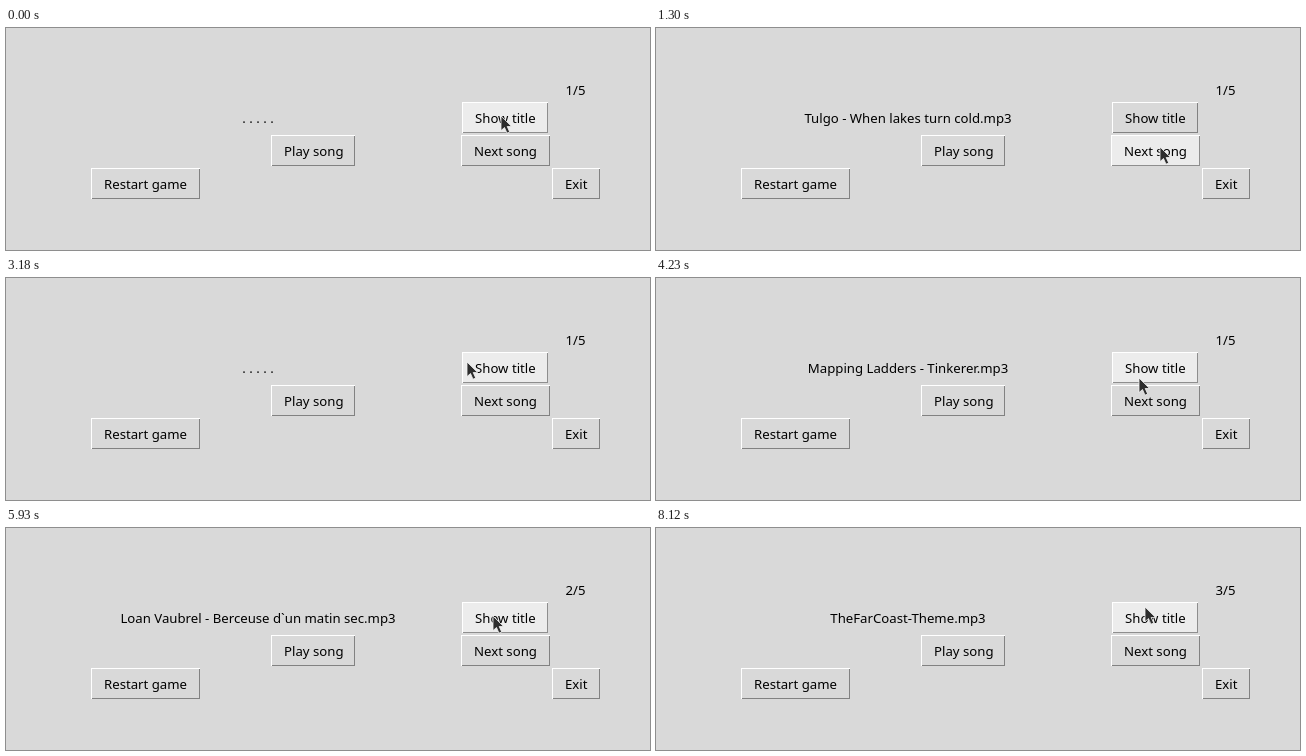
Recreate the animation shown at these times as an HTML page. Size 644 by 222 pixels, loop 8200 ms.

```html
<!DOCTYPE html>
<html lang="en">
<head>
<meta charset="utf-8">
<title>Song quiz</title>
<style>
  html, body { margin: 0; width: 100%; height: 100%; overflow: hidden; background: #d9d9d9; }
  svg { display: block; width: 644px; height: 222px; }
  text { font: 13.2px "Noto Sans", "Open Sans", sans-serif; fill: #000; white-space: pre; }
  .mid { text-anchor: middle; }
  .button { --face: #d9d9d9; --lit: #fff; --dark: #828282; }
  .button.hot { --face: #ececec; --dark: #8e8e8e; }
  .button rect { fill: var(--face); }
  .edge { fill: none; shape-rendering: crispEdges; }
  .near { stroke: var(--lit); }
  .far { stroke: var(--dark); }
  .down .near { stroke: var(--dark); }
  .down .far { stroke: var(--lit); }
  .down text { transform: translate(2px, 2px); }
</style>
</head>
<body>
<svg viewBox="0 0 644 222">
  <text id="count" class="mid" x="569.5" y="67"></text>
  <text id="title" class="mid" x="252" y="95"></text>
  <g id="buttons"></g>
  <path id="cursor" d="M0 0V14.6L3.5 11.5L6 17.2L8.7 16L6.2 10.5H10.6Z"
        fill="#2d2d2d" stroke="#f4f4f4" stroke-width=".8" stroke-linejoin="round"/>
</svg>
<script>
const LOOP = 8200, STEP = 80, HEIGHT = 31, ROW = 33, TOP = 74;
const $ = id => document.getElementById(id);

function makeButton(label, x, row, w) {
  const y = TOP + row * ROW;
  const el = document.createElementNS('http://www.w3.org/2000/svg', 'g');
  el.setAttribute('class', 'button');
  el.setAttribute('transform', `translate(${x} ${y})`);
  el.innerHTML = `<rect width="${w}" height="${HEIGHT}"/>
    <path class="edge far" d="M0 ${HEIGHT - 0.5}H${w}M${w - 0.5} 0V${HEIGHT}"/>
    <path class="edge near" d="M0 .5H${w}M.5 0V${HEIGHT}"/>
    <text x="13" y="21">${label}</text>`;
  $('buttons').append(el);
  const contains = (px, py) => px >= x && px < x + w && py >= y && py < y + HEIGHT;
  return { el, contains };
}

const show = makeButton('Show title', 456, 0, 86);
const play = makeButton('Play song', 265, 1, 84);
const next = makeButton('Next song', 455, 1, 89);
const restart = makeButton('Restart game', 85, 2, 109);
const exit = makeButton('Exit', 546, 2, 48);
const buttons = [show, play, next, restart, exit];

const songs = [
  'Tulgo - When lakes turn cold.mp3',
  'Mapping Ladders - Tinkerer.mp3',
  'Loan Vaubrel - Berceuse d`un matin sec.mp3',
  'TheFarCoast-Theme.mp3',
];

const START = { x: 495, y: 88 };
const glides = [], clicks = [];
const glide = (at, steps, x, y, sag = 0) => glides.push({ at, steps, x, y, sag });
const click = (button, from, to) => clicks.push({ button, from, to });

click(show, 330, 490);
glide(900, 6, 504, 119);
glide(1380, 5, 160, 146, 40);
click(restart, 1940, 2770);
glide(3020, 5, 482, 80);
click(show, 3580, 3740);
glide(4230, 3, 484, 108);
click(next, 4550, 5440);     // the pointer leaves while the button is still held
glide(5040, 4, 487, 88);
click(show, 5770, 5930);
glide(6340, 2, 494, 117);
click(next, 6670, 7400);
glide(7080, 5, 497, 78);
click(show, 7640, 7880);
glide(8120, 1, 489, 79);

const easeOut = p => 1 - (1 - p) ** 3;

function pointerAt(t) {
  let { x, y } = START;
  for (const g of glides) {
    if (t < g.at) break;
    const step = Math.floor((t - g.at) / STEP) + 1;
    const p = easeOut(Math.min(1, step / g.steps));
    x += (g.x - x) * p;
    y += (g.y - y) * p + g.sag * Math.sin(Math.PI * p);
  }
  return [Math.round(x), Math.round(y)];
}

// Replays every finished click up to time t
function gameAt(t) {
  let song = 0, count = 1, shown = false;
  for (const { button, to } of clicks) {
    if (t < to) break;
    shown = button === show;
    if (!shown) song++;
    if (button === next) count++;
    if (button === restart) count = 1;
  }
  return { title: shown ? songs[song] : '. . . . .', count: `${count}/5` };
}

function draw(t) {
  const [x, y] = pointerAt(t);
  const held = clicks.find(c => t >= c.from && t < c.to)?.button;
  for (const b of buttons) {
    b.el.classList.toggle('hot', held ? b === held : b.contains(x, y));
    b.el.classList.toggle('down', b === held);
  }
  const { title, count } = gameAt(t);
  $('title').textContent = title;
  $('count').textContent = count;
  $('cursor').setAttribute('transform', `translate(${x} ${y})`);
}

const begin = performance.now();
function tick() {
  draw((performance.now() - begin) % LOOP);
  requestAnimationFrame(tick);
}
tick();
</script>
</body>
</html>
```
